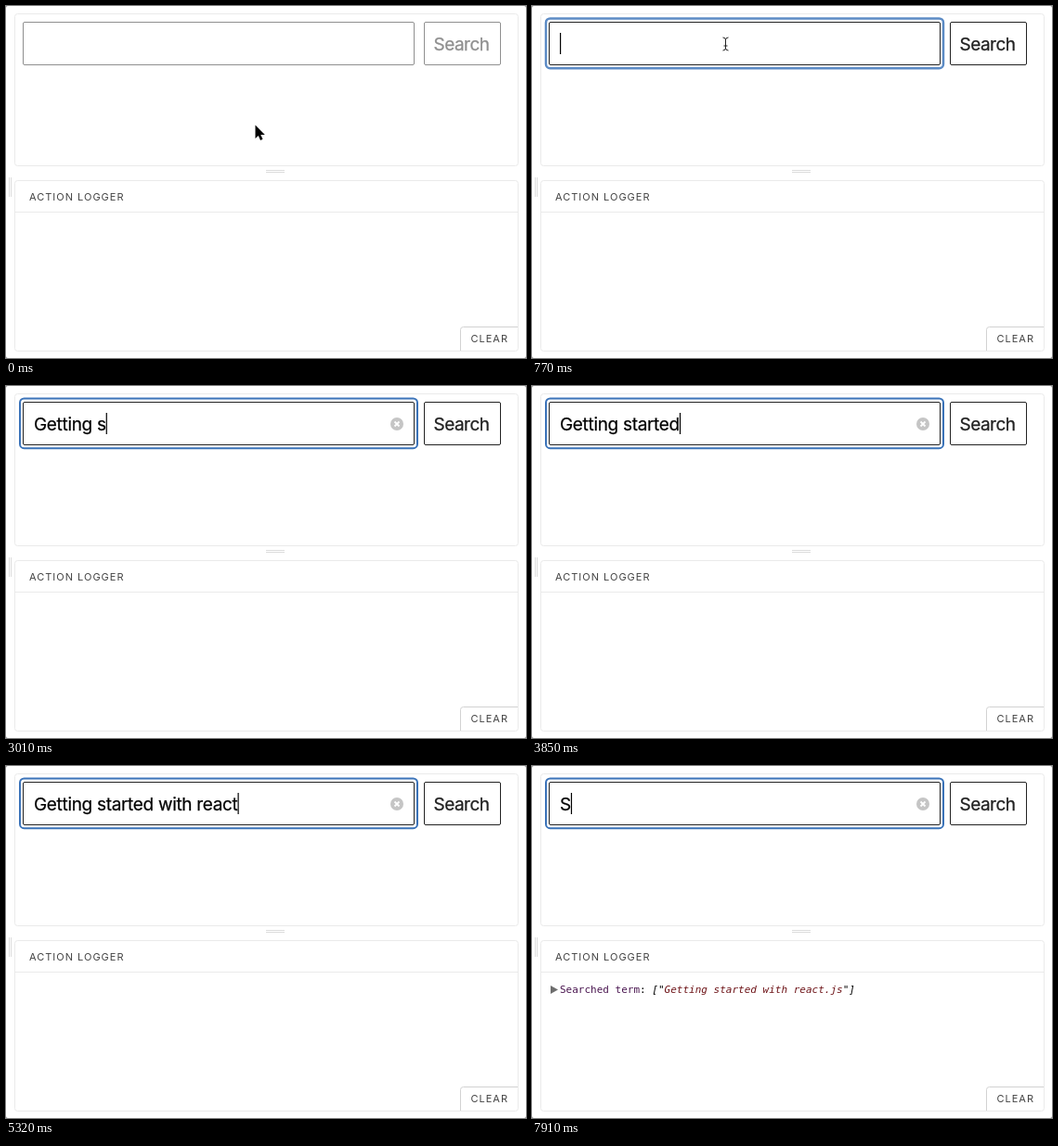
Animation of 560 by 380 pixels, one loop 8 s. Source, as an HTML page:

```html
<!DOCTYPE html>
<html lang="en">
<head>
<meta charset="utf-8">
<title>Search field</title>
<style>
html, body { margin: 0; width: 100%; height: 100%; overflow: hidden; background: #888; }
svg { display: block; width: 560px; height: 380px; }
text { font-family: Inter, Roboto, sans-serif; white-space: pre; }
.panel { fill: #fff; stroke: #eaeaea; }
.grip { stroke: #dcdcdc; }
.box { fill: #fff; stroke: #222; }
.big { font-size: 19px; letter-spacing: -.32px; stroke: #111; stroke-width: .25px; }
.label { fill: #222; letter-spacing: -.5px; }
.caps { font-size: 11px; letter-spacing: 1px; fill: #444; }
.log text { font: 11px "DejaVu Sans Mono", monospace; }
.log .value { font-style: italic; }
</style>
</head>
<body>
<svg viewBox="0 0 560 380">
  <rect width="560" height="380" rx="2" fill="#fff"/>
  <rect class="panel" x="9.5" y="8.5" width="542" height="164" rx="3"/>
  <rect class="panel" x="9.5" y="188.5" width="542" height="184" rx="3"/>
  <path class="panel" d="M10 222.5H551"/>
  <path class="grip" d="M280 177.5h20M280 179.5h20M3.5 185v21M5.5 185v21"/>
  <text class="caps" x="25" y="210">ACTION LOGGER</text>
  <path d="M489.5 372V349.5q0-3 3-3H551" fill="none" stroke="#d2d2d2"/>
  <text class="caps" x="500.5" y="363">CLEAR</text>

  <g id="form">
    <rect class="box" x="18.5" y="17.5" width="421" height="46" rx="1.5"/>
    <rect class="box" x="450.5" y="17.5" width="82" height="46" rx="1.5"/>
    <text class="big label" x="460.5" y="48">Search</text>
  </g>
  <rect id="ring" x="15" y="13.4" width="428" height="53.8" rx="4.5" fill="none" stroke="#3b73b9"/>
  <text id="query" class="big" x="30" y="48"></text>
  <rect id="caret" y="29" width="1.2" height="23"/>
  <g id="reset" transform="translate(421 41)">
    <circle r="7" fill="#c5c5c5"/>
    <path d="M-2.5-2.5l5 5m0-5l-5 5" stroke="#fff" stroke-width="1.8"/>
  </g>

  <g id="log" class="log">
    <path d="M20 237l8 4.5-8 4.5z" fill="#6e6e6e"/>
    <text x="30" y="245"><tspan fill="#4a1650">Searched term</tspan>: <tspan class="value">["<tspan fill="#6e1418">Getting started with react.js</tspan>"]</tspan></text>
  </g>

  <path id="arrow" d="M0 0V14.5l3.3-3.1 2.2 5 2.5-1.1-2.2-4.9H10.3z" stroke="#fff" stroke-width="1.2" paint-order="stroke"/>
  <path id="beam" d="M-3-7q3 0 3 2.5q0-2.5 3-2.5M0-5V5M-3 7q3 0 3-2.5q0 2.5 3 2.5M-2 2h4" fill="none" stroke="#222"/>
</svg>
<script>
const LOOP = 8000, FOCUS = 630, SUBMIT = 6650;
const term = "Getting started with react.js";
// Time at which each character of the term is typed
const keys = [
  1820, 1960, 2100, 2240, 2380, 2520, 2660, 2870,
  3010, 3220, 3360, 3500, 3570, 3710, 3850, 3990,
  4130, 4200, 4340, 4480, 4550,
  4690, 4760, 4900, 5040, 5320, 6160, 6300, 6440
];
// Spans in which the caret is blinked off
const blinks = [[1190, 1750], [5810, 6160], [7140, 7700]];

const el = id => document.getElementById(id);
const [form, ring, query, caret, reset, log, arrow, beam] =
  ["form", "ring", "query", "caret", "reset", "log", "arrow", "beam"].map(el);
const show = (node, on) => node.setAttribute("visibility", on ? "visible" : "hidden");
const ramp = (t, from, to) => Math.min(1, Math.max(0, (t - from) / (to - from)));
const mix = (a, b, p) => a + (b - a) * p;

function typed(t) {
  if (t >= SUBMIT) return t >= 7910 ? "S" : "";
  return term.slice(0, keys.filter(k => k <= t).length);
}

function draw(t) {
  const focused = t >= FOCUS;
  form.setAttribute("opacity", mix(.5, 1, ramp(t, FOCUS - 70, FOCUS + 140)));

  const glow = ramp(t, FOCUS - 70, 840);
  show(ring, focused);
  ring.setAttribute("stroke-width", mix(4, 2, glow));
  ring.setAttribute("opacity", mix(.3, 1, glow));

  const text = typed(t);
  query.textContent = text;
  show(reset, text);
  caret.setAttribute("x", 30 + (text ? query.getComputedTextLength() : 0));
  show(caret, focused && !blinks.some(([off, on]) => t >= off && t < on));
  show(log, t >= SUBMIT);

  const p = ramp(t, 0, 420), move = p * p * (3 - 2 * p);
  const x = mix(268.5, 208.5, move), y = mix(128.5, 41, move);
  const inField = y < 64;
  show(arrow, !inField);
  show(beam, inField && t < 840);
  for (const pointer of [arrow, beam]) pointer.setAttribute("transform", `translate(${x} ${y})`);
}

function frame() {
  draw(performance.now() % LOOP);
  requestAnimationFrame(frame);
}
frame();
</script>
</body>
</html>
```
